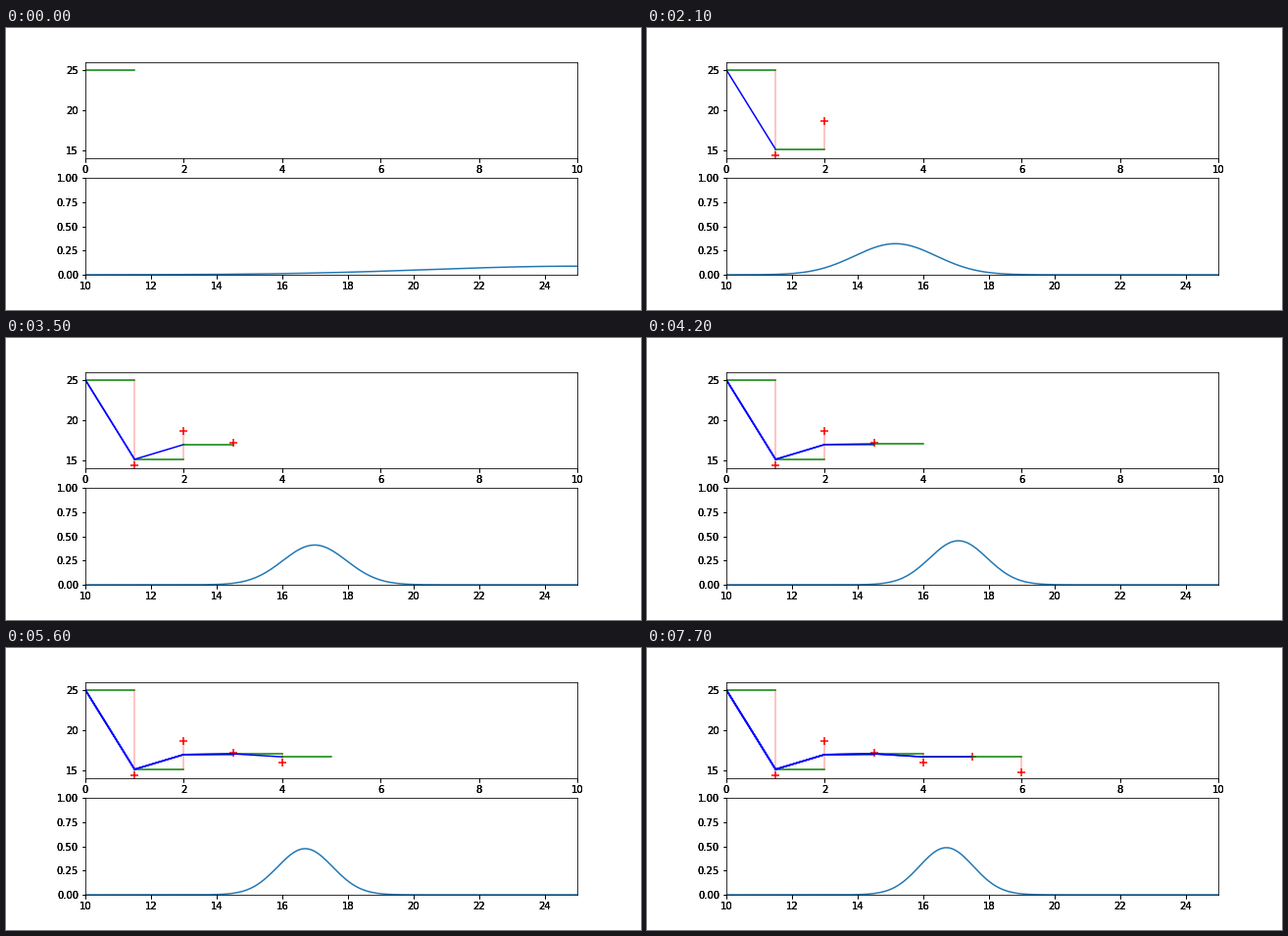
A matplotlib script that plays this animation: 648x288 px, repeating every 8000 ms.

```python
import numpy as np
import matplotlib.pyplot as plt
from matplotlib.animation import FuncAnimation

STEP_TICKS = 7          # 7 * 50 ms = 350 ms per step
TICKS = 160             # 160 * 50 ms = 8 s
LAST_STEP = (TICKS - 1) // STEP_TICKS

Q, R = 0.2, 1.44        # process and measurement variance
MEASURED = [14.45, 18.7, 17.2, 16.0, 16.72, 14.78]

plt.rcParams.update({"font.family": "DejaVu Sans", "font.size": 10})
fig, (track, density) = plt.subplots(2, 1, figsize=(9, 4), dpi=72)
fig.subplots_adjust(left=0.125, right=0.9, bottom=0.125, top=0.88, hspace=0.2)


def style(ax, **scale):
    """Set limits and ticks; overlaid copies make the labels heavier."""
    ax.set(**scale)
    for _ in range(2):
        copy = fig.add_axes(ax.get_position(), frameon=False)
        copy.set(**scale)


style(track, xlim=(0, 10), ylim=(14, 26),
      xticks=range(0, 11, 2), yticks=[15, 20, 25])
style(density, xlim=(10, 25), ylim=(0, 1),
      xticks=range(10, 25, 2), yticks=np.linspace(0, 1, 5))

grid = np.linspace(10, 25, 200)
curve, = density.plot([], [], color="tab:blue", lw=1.5)


def gauss(mean, var):
    return np.exp(-(grid - mean) ** 2 / (2 * var)) / np.sqrt(2 * np.pi * var)


parts = []              # (first step, line)
beliefs = []            # (mean, variance) per step


def add(xs, ys, *fmt, **look):
    line, = track.plot(xs, ys, *fmt, zorder=2 + len(parts) / 100, **look)
    parts.append((len(beliefs), line))


# Each cycle: predict, measure, residual, update.
mean, var = 25.0, 20.0
history = [mean]
for t, z in enumerate(MEASURED, start=1):
    var += Q
    add([t - 1, t], [mean, mean], "g", lw=1.5)
    beliefs.append((mean, var))

    add([t], [z], "r+", ms=7.5, mew=1.5)
    beliefs.append((mean, var))

    add([t, t], [mean, z], "r", lw=1.5, alpha=0.3)
    beliefs.append((mean, var))

    gain = var / (var + R)
    mean += gain * (z - mean)
    var *= 1 - gain
    history.append(mean)
    add(range(t + 1), history[:], "b", lw=1.5)
    beliefs.append((mean, var))


def draw(tick):
    step = min(tick // STEP_TICKS, LAST_STEP)
    for start, line in parts:
        line.set_visible(start <= step)
    curve.set_data(grid, gauss(*beliefs[step]))
    return [curve]


anim = FuncAnimation(fig, draw, frames=TICKS, interval=50,
                     repeat=True, repeat_delay=0, blit=False)
plt.show()
```
